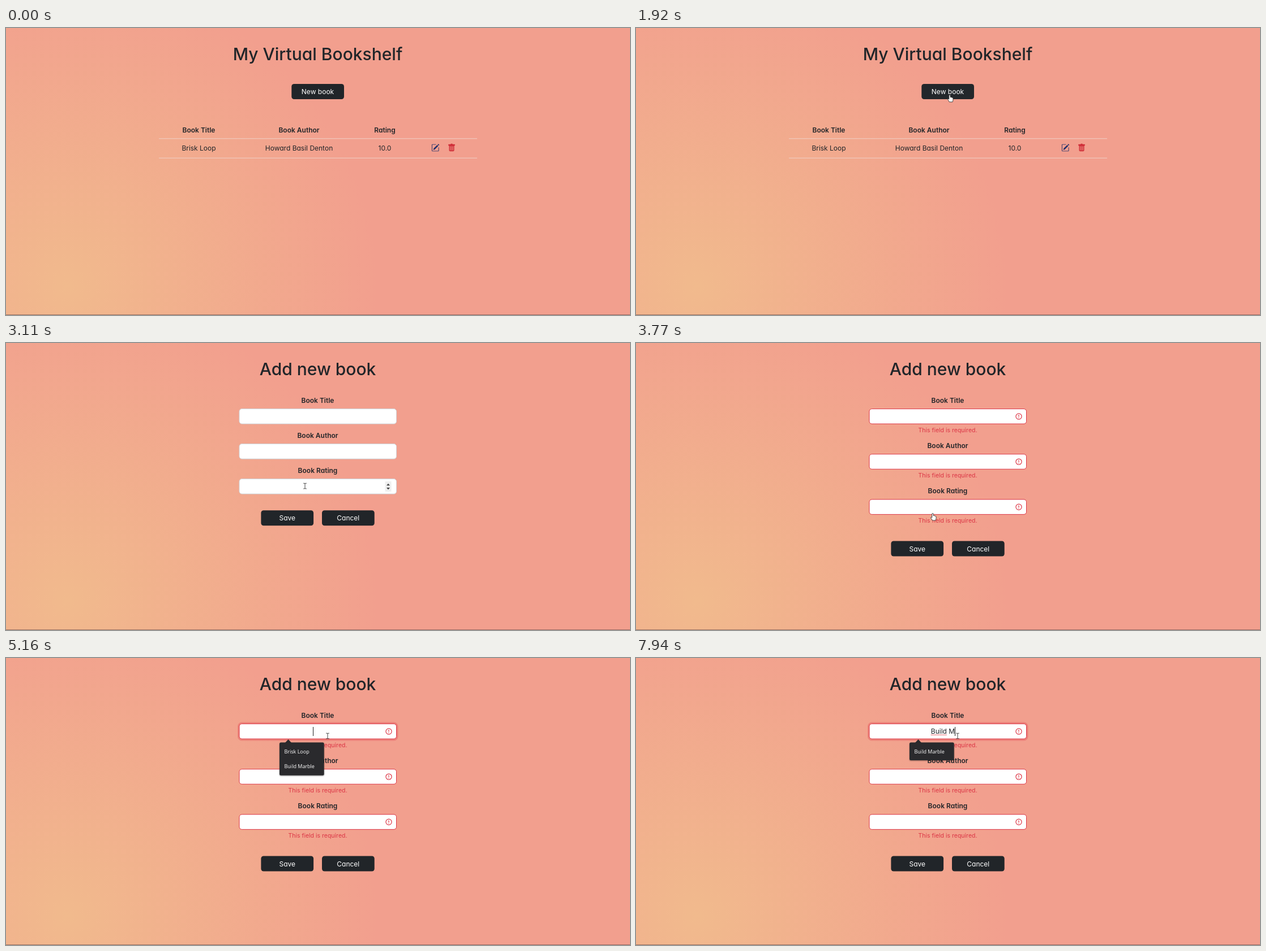
Animation, 1102 px wide and 508 px high, one loop 8000 ms. Source, as an HTML page:

```html
<!DOCTYPE html>
<html lang="en">
<head>
<meta charset="utf-8">
<title>Bookshelf</title>
<style>
html, body { margin: 0; width: 100%; height: 100%; overflow: hidden; }
body { background: radial-gradient(circle at 10% 90%, #f1ba8d, #f29f8e 50%); }
svg { display: block; width: 1102px; height: 508px; }
text { font: 12px Inter, "Open Sans", sans-serif; font-feature-settings: "cv11"; fill: #212529; text-anchor: middle; white-space: pre; }
.title { font-size: 30px; font-weight: 500; }
.bold { font-weight: 600; }
.light { fill: #fff; }
.error { font-size: 10.5px; fill: #dc3545; }
.small { font: 9px "Open Sans", "Noto Sans", sans-serif; fill: #fff; text-anchor: start; }
.button { fill: #212529; }
.field { fill: #fff; stroke: #ced4da; }
.invalid .field { stroke: #dc3545; }
.icon { fill: none; stroke: #dc3545; stroke-width: 1.2; }
.cursor { fill: #fff; stroke: #222; stroke-width: .8; stroke-linejoin: round; }
</style>
</head>
<body>
<svg viewBox="0 0 1102 508">
  <path d="M0 507.5H1102" stroke="#6b4a48" stroke-opacity=".6"/>

  <g id="list">
    <text class="title" x="550.5" y="57">My Virtual Bookshelf</text>
    <rect id="newButton" class="button" x="504.3" y="99" width="92.7" height="27" rx="4.5"/>
    <text class="light" x="550.5" y="117">New book</text>
    <text class="bold" x="340.5" y="185">Book Title</text>
    <text class="bold" x="517.5" y="185">Book Author</text>
    <text class="bold" x="669" y="185">Rating</text>
    <path d="M270 195.8H832M270 230.2H832" stroke="#efd0c7"/>
    <text x="340.5" y="217">Brisk Loop</text>
    <text x="517.5" y="217">Howard Basil Denton</text>
    <text x="669" y="217">10.0</text>
    <path transform="translate(751 204.8) scale(.9)" fill="#22306b" d="M15.5 1.94a.5.5 0 0 1 0 .7L14.46 3.69l-2-2L13.5.65a.5.5 0 0 1 .7 0zM13.75 4.4l-2-2L4.94 9.2l-.93 2.62a.25.25 0 0 0 .32.32l2.61-.93zM1 13.5A1.5 1.5 0 0 0 2.5 15h11a1.5 1.5 0 0 0 1.5-1.5v-6a.5.5 0 0 0-1 0v6a.5.5 0 0 1-.5.5h-11a.5.5 0 0 1-.5-.5v-11a.5.5 0 0 1 .5-.5H9a.5.5 0 0 0 0-1H2.5A1.5 1.5 0 0 0 1 2.5z"/>
    <path transform="translate(779.8 204.8) scale(.9)" fill="#d0303a" fill-rule="evenodd" d="M2.5 1a1 1 0 0 0-1 1v1a1 1 0 0 0 1 1H3v9a2 2 0 0 0 2 2h6a2 2 0 0 0 2-2V4h.5a1 1 0 0 0 1-1V2a1 1 0 0 0-1-1H10a1 1 0 0 0-1-1H7a1 1 0 0 0-1 1zM5 5h1v8H5zM7.5 5h1v8h-1zM10 5h1v8h-1z"/>
  </g>

  <g id="form">
    <text class="title" x="550.5" y="57">Add new book</text>
    <rect id="ring" x="410.5" y="115" width="280.5" height="30" rx="6" fill="none" stroke="#dc3545" stroke-opacity=".3" stroke-width="3"/>
    <g id="rows"></g>
    <g id="spinner">
      <rect x="669.5" y="245" width="11" height="18" fill="#efefef"/>
      <path d="M672 252.3l3-3.6 3 3.6zM672 256l3 3.6 3-3.6z" fill="#444"/>
    </g>
    <g id="actions">
      <rect id="saveButton" class="button" x="450.4" y="0" width="92.7" height="27" rx="4.5"/>
      <text class="light" x="496.8" y="18">Save</text>
      <rect class="button" x="558" y="0" width="92.7" height="27" rx="4.5"/>
      <text class="light" x="604.3" y="18">Cancel</text>
    </g>
    <text id="entry" x="542" y="134"></text>
    <path id="squiggle" fill="none" stroke="#e0343c" stroke-width="1.2" stroke-dasharray="1.5 1"/>
    <path id="caret" stroke="#222"/>
    <g id="menu">
      <path d="M492.5 150.5l6-6.5 6 6.5z" fill="#2a2a2d"/>
      <rect id="menuBox" x="483" y="149.5" width="78.7" rx="2.5" fill="#2a2a2d" style="filter: drop-shadow(0 1px 1px #0006)"/>
      <text id="first" class="small" x="491.5" y="169"></text>
      <text id="second" class="small" x="491.5" y="195">Build Marble</text>
    </g>
  </g>

  <g id="status">
    <path d="M0 494.5H74q3 0 3 3V508H0z"/>
    <text class="small" x="-1" y="505.5">lib.test:4100/add</text>
  </g>

  <path id="arrow" class="cursor" d="M0 0V10.2L2.4 8 4 11.6 5.6 10.9 4.1 7.4H7.4z"/>
  <path id="hand" class="cursor" d="M-1.2 1.2Q0-.6 1.2 1.2V4.6Q2.2 3.8 3 5 4 4.3 4.6 5.6 5.8 5 6 6.6V9.3Q6 11 5 13H-.6Q-1.4 11-3.6 8.3-3.6 6.5-1.2 8z"/>
  <path id="beam" fill="none" stroke="#333" stroke-width=".9" d="M-2.8-4.8H-1Q0-4.8 0-3.8 0-4.8 1-4.8H2.8M0-3.8V3.8M-2.8 4.8H-1Q0 4.8 0 3.8 0 4.8 1 4.8H2.8"/>
</svg>
<script>
const LOOP = 8000;
const $ = id => document.getElementById(id);
const show = (id, on) => { $(id).style.display = on ? '' : 'none'; };
const ramp = (t, from, span) => Math.min(1, Math.max(0, (t - from) / span));

// Cursor way points: time, x, y
const route = [
  [390, 896, 489], [790, 716, 391], [1190, 716, 391], [1920, 554, 118],
  [1980, 551, 112], [2900, 551, 112], [3110, 528, 253], [3500, 524, 301],
  [4300, 524, 301], [4500, 654, 215], [4710, 568, 138]
];
const cursors = [[0, ''], [390, 'arrow'], [1890, 'hand'], [2950, 'beam'],
  [3210, 'arrow'], [3390, 'hand'], [4350, 'beam']];
const typed = [[0, ''], [5490, 'B'], [5950, 'Bu'], [6150, 'Bui'], [6420, 'Buil'],
  [6680, 'Build'], [7610, 'Build '], [7940, 'Build M']];

const latest = (list, t) => list.filter(item => item[0] <= t).pop()[1];

function position(t) {
  const next = route.findIndex(p => p[0] > t);
  if (next < 0) return route[route.length - 1].slice(1);
  if (!next) return route[0].slice(1);
  const [a, b] = [route[next - 1], route[next]];
  const k = ramp(t, a[0], b[0] - a[0]);
  return [a[1] + (b[1] - a[1]) * k, a[2] + (b[2] - a[2]) * k];
}

function buttonColor(t, hover, press) {
  const k = ramp(t, hover, 150) * 33 + ramp(t, press, 100) * 11;
  return `rgb(${33 + k},${37 + k},${41 + k})`;
}

function layForm(invalid) {
  const step = invalid ? 80.15 : 62;
  $('rows').setAttribute('class', invalid ? 'invalid' : '');
  $('rows').innerHTML = ['Title', 'Author', 'Rating'].map((name, i) => `
    <g transform="translate(0 ${i * step})">
      <text class="bold" x="550.5" y="106">Book ${name}</text>
      <rect class="field" x="412" y="116.6" width="277.5" height="26.5" rx="4.5"/>
      ${invalid ? `<circle class="icon" cx="676" cy="130" r="5.1"/>
      <path class="icon" d="M676 127V130.6M676 131.8V133"/>
      <text class="error" x="550.5" y="157.5">This field is required.</text>` : ''}
    </g>`).join('');
  $('actions').setAttribute('transform', `translate(0 ${invalid ? 350.5 : 296.3})`);
}

let wasInvalid;

function draw(t) {
  const onForm = t >= 2640, invalid = t >= 3770;
  show('list', !onForm);
  show('form', onForm);
  if (invalid !== wasInvalid) layForm(wasInvalid = invalid);

  $('newButton').style.fill = buttonColor(t, 1910, 2440);
  $('saveButton').style.fill = invalid ? '#212529' : buttonColor(t, 3390, 3640);
  show('spinner', t >= 3080 && t < 3210);
  show('status', t >= 2100 && t < 2900);
  $('status').style.opacity = ramp(t, 2050, 150);

  $('ring').style.opacity = ramp(t, 4900, 150);
  show('ring', t >= 4960);
  show('menu', t >= 5090);
  const filtered = t >= 5560;
  $('first').textContent = filtered ? 'Build Marble' : 'Brisk Loop';
  show('second', !filtered);
  $('menuBox').setAttribute('height', filtered ? 31.5 : 58.3);

  const entry = $('entry'), value = latest(typed, t);
  entry.textContent = value;
  const half = value ? entry.getComputedTextLength() / 2 : 0;
  $('caret').setAttribute('d', `M${Math.round(542 + half) + .5} 122V138`);
  show('caret', t >= 4960 && !(t >= 7140 && t < 7610));
  show('squiggle', t >= 7610);
  if (t >= 7610)
    $('squiggle').setAttribute('d', `M${542 - half} 136.2h${entry.getSubStringLength(0, 5)}`);

  const shape = latest(cursors, t), [x, y] = position(t);
  for (const id of ['arrow', 'hand', 'beam']) show(id, id === shape);
  if (shape) $(shape).setAttribute('transform', `translate(${x} ${y})`);
}

const start = performance.now();
function tick() {
  draw((performance.now() - start) % LOOP);
  requestAnimationFrame(tick);
}
tick();
</script>
</body>
</html>
```
